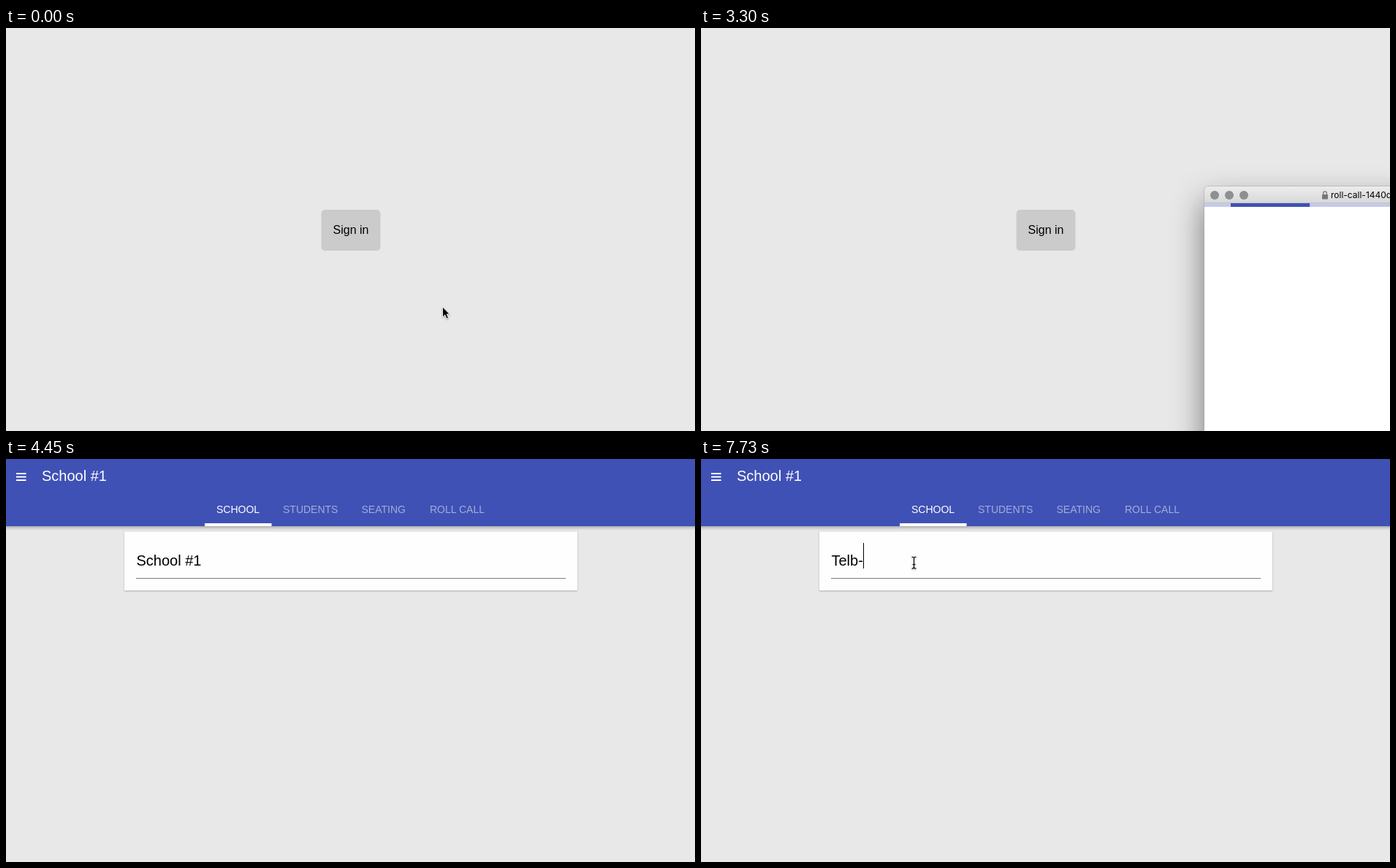
An HTML page for the animation above (8 s loop, 943 by 552 pixels).

```html
<!DOCTYPE html>
<html lang="en">
<head>
<meta charset="utf-8">
<title>Sign in</title>
<style>
  html, body { margin: 0; width: 100%; height: 100%; overflow: hidden; background: #e8e8e8; }
  svg { display: block; font-family: "Liberation Sans", Arial, sans-serif; }
  text { white-space: pre; }
  #popup text { font: 12px Inter, Roboto, sans-serif; }
  #shade { filter: blur(22px); }
  .tabs { font-size: 14px; fill: #fff; }
  .tabs .off { fill-opacity: .52; }
  .big { font-size: 20px; }
  .bar { filter: drop-shadow(0 2px 2px rgba(0, 0, 0, .3)); }
  .card { filter: drop-shadow(0 1px 1px rgba(0, 0, 0, .25)); }
  #mouse { filter: drop-shadow(0 1px 1px rgba(0, 0, 0, .35)); }
</style>
</head>
<body>
<svg width="943" height="552" viewBox="0 0 943 552">
  <g id="login">
    <rect x="431.5" y="249" width="81" height="56" rx="5" fill="#cbcbcb"/>
    <text x="447.5" y="282" font-size="16">Sign in</text>
  </g>

  <g id="app">
    <rect class="bar" x="-9" y="-9" width="961" height="101" fill="#3f51b5"/>
    <path d="M14 20h13.5M14 24.5h13.5M14 29h13.5" stroke="#fff" stroke-width="2.2"/>
    <text class="big" x="49" y="30" fill="#fff">School #1</text>
    <g class="tabs">
      <text x="288" y="74">SCHOOL</text>
      <text class="off" x="379" y="74">STUDENTS</text>
      <text class="off" x="486.5" y="74">SEATING</text>
      <text class="off" x="580" y="74">ROLL CALL</text>
    </g>
    <rect x="272" y="88" width="91.5" height="4" fill="#fff"/>
    <rect class="card" x="162" y="99.5" width="620" height="80.5" fill="#fefefe"/>
    <rect x="178" y="163" width="588" height="1" fill="#7b7b7b"/>
    <rect id="selection" x="179" y="115" width="88" height="35" fill="#d7d8d9"/>
    <text id="field" class="big" x="178.5" y="146"></text>
    <rect id="caret" y="115" width="1" height="35"/>
  </g>

  <g id="popup">
    <rect id="shade" y="20" width="511" height="681" rx="5" fill-opacity=".5"/>
    <rect x="-.5" y="-.5" width="512" height="682" rx="5.5" fill="#a8a8a8"/>
    <rect width="511" height="681" rx="5" fill="url(#chrome)"/>
    <rect y="22" width="511" height="659" fill="#c4c4c4"/>
    <rect y="23" width="511" height="658" fill="#fff"/>
    <g fill="#8e8f91">
      <circle cx="14" cy="12" r="6"/><circle cx="34" cy="12" r="6"/><circle cx="54" cy="12" r="6"/>
    </g>
    <g id="lock">
      <rect x="161" y="11" width="8" height="6.5" rx=".8" fill="#777"/>
      <path d="M162.7 11V9.2a2.3 2.3 0 0 1 4.6 0V11" fill="none" stroke="#777" stroke-width="1.3"/>
    </g>
    <text id="address" y="16"></text>
    <rect id="track" y="23" width="511" height="5" fill="#c5cae9"/>
    <rect id="progress" y="23" height="5" fill="#3f51b5"/>
  </g>

  <g id="mouse">
    <path id="arrow" d="M.5 1V15L3.8 12L6 17.2L8.5 16.1L6.3 11H10.3Z" stroke="#fff" stroke-width=".9"/>
    <path id="hand" d="M0 10V1.8a1.4 1.4 0 0 1 2.8 0V6.4q1.3-1 2.5 .3q1.4-.7 2.4 .6q2-.4 2.4 1.4V12q-.2 2-1.3 3.5V17H1.8V15.5L-3.2 10.4q-.6-1.6 1-1.8Z"
      fill="#fff" stroke="#000"/>
    <g id="beam" fill="none">
      <path d="M-3-8q3 0 3 2v12q0 2-3 2M3-8q-3 0-3 2M3 8q-3 0-3-2M-2 2.5h4" stroke="#fff" stroke-width="2" stroke-opacity=".6"/>
      <path d="M-3-8q3 0 3 2v12q0 2-3 2M3-8q-3 0-3 2M3 8q-3 0-3-2M-2 2.5h4" stroke="#000" stroke-width="1.1"/>
    </g>
  </g>

  <defs>
    <linearGradient id="chrome" x2="0" y2="23" gradientUnits="userSpaceOnUse">
      <stop stop-color="#ececec"/><stop offset="1" stop-color="#d8d8d8"/>
    </linearGradient>
  </defs>
</svg>
<script>
const LOOP = 8000, WIDTH = 511, HEIGHT = 681;
const $ = id => document.getElementById(id);
const show = (id, on) => { $(id).style.display = on ? "" : "none"; };
const set = (id, attrs) => { for (const k in attrs) $(id).setAttribute(k, attrs[k]); };
const mix = (a, b, p) => a + (b - a) * p;
const easeOut = p => 1 - (1 - p) ** 3;
const easeBack = p => 1 + 2.7 * (p - 1) ** 3 + 1.7 * (p - 1) ** 2;

// progress in n jumps, the first at a and the last at b
function steps(t, a, b, n) {
  if (t < a) return 0;
  return Math.min(n, Math.floor((t - a) / (b - a) * (n - 1) + 1e-6) + 1) / n;
}

function pointer(t) {
  if (t < 2260) {
    const p = steps(t, 1410, 1790, 6);
    const x = mix(597, t < 2090 ? 475 : 476, easeOut(p)), y = mix(381, 276, easeBack(p));
    return [x < 512 && y < 305 ? "hand" : "arrow", x, y];
  }
  if (t < 3060) return ["arrow", 476, 275];
  if (t < 5020) return [];
  if (t < 5730) {
    const p = easeOut(steps(t, 5020, 5440, 8));
    return ["arrow", mix(943, 402, p), mix(257, 335, p)];
  }
  const p = steps(t, 5730, 6080, 6), e = p * p * (3 - 2 * p);
  const x = mix(402, 291.5, e), y = mix(335, 142, e);
  return [y < 164 ? "beam" : "arrow", x, y];
}

function drawMouse(t) {
  const [kind, x, y] = pointer(t);
  for (const id of ["arrow", "hand", "beam"]) show(id, id === kind);
  if (kind) set("mouse", { transform: `translate(${x} ${y})` });
}

function drawPopup(t) {
  const open = t >= 2440 && t < 4180;
  show("popup", open);
  if (!open) return;
  const out = steps(t, 3890, 4180, 5);
  const scale = t < 2530 ? .765 : 1 - .06 * out;
  const x = 944.5 - WIDTH / 2 * scale, y = 557.5 - HEIGHT / 2 * scale;
  set("popup", { transform: `translate(${x} ${y}) scale(${scale})`, opacity: t < 2530 ? .66 : 1 - out });

  const loaded = t >= 2710;
  show("lock", loaded);
  $("address").textContent = loaded ? "roll-call-1440d" : "about:invalid";
  set("address", { x: loaded ? 173 : 190 });
  show("track", t >= 2880);
  show("progress", t >= 3060);
  const tick = 3060 + Math.floor((Math.min(t, 3800) - 3060) / 80) * 80;
  const p = Math.max(0, (tick - 3018) / 1000);
  set("progress", { x: WIDTH * .25 * p, width: WIDTH * .75 * p });
}

function drawField(t) {
  const typed = t >= 7730 ? 5 : 4 * steps(t, 6660, 7010, 4);
  $("field").textContent = t < 6660 ? "School #1" : "Telb-".slice(0, typed);
  show("selection", t >= 6420 && t < 6660);
  show("caret", t >= 6150 && t < 6420 || t >= 6660 && t < 7490 || t >= 7730);
  const end = Math.round(179 + $("field").getComputedTextLength());
  set("caret", { x: t < 6660 ? 267 : end });
}

function draw(now) {
  const t = now % LOOP;
  show("login", t < 4450);
  show("app", t >= 4450);
  if (t >= 4450) drawField(t);
  drawPopup(t);
  drawMouse(t);
  requestAnimationFrame(draw);
}
requestAnimationFrame(draw);
</script>
</body>
</html>
```
